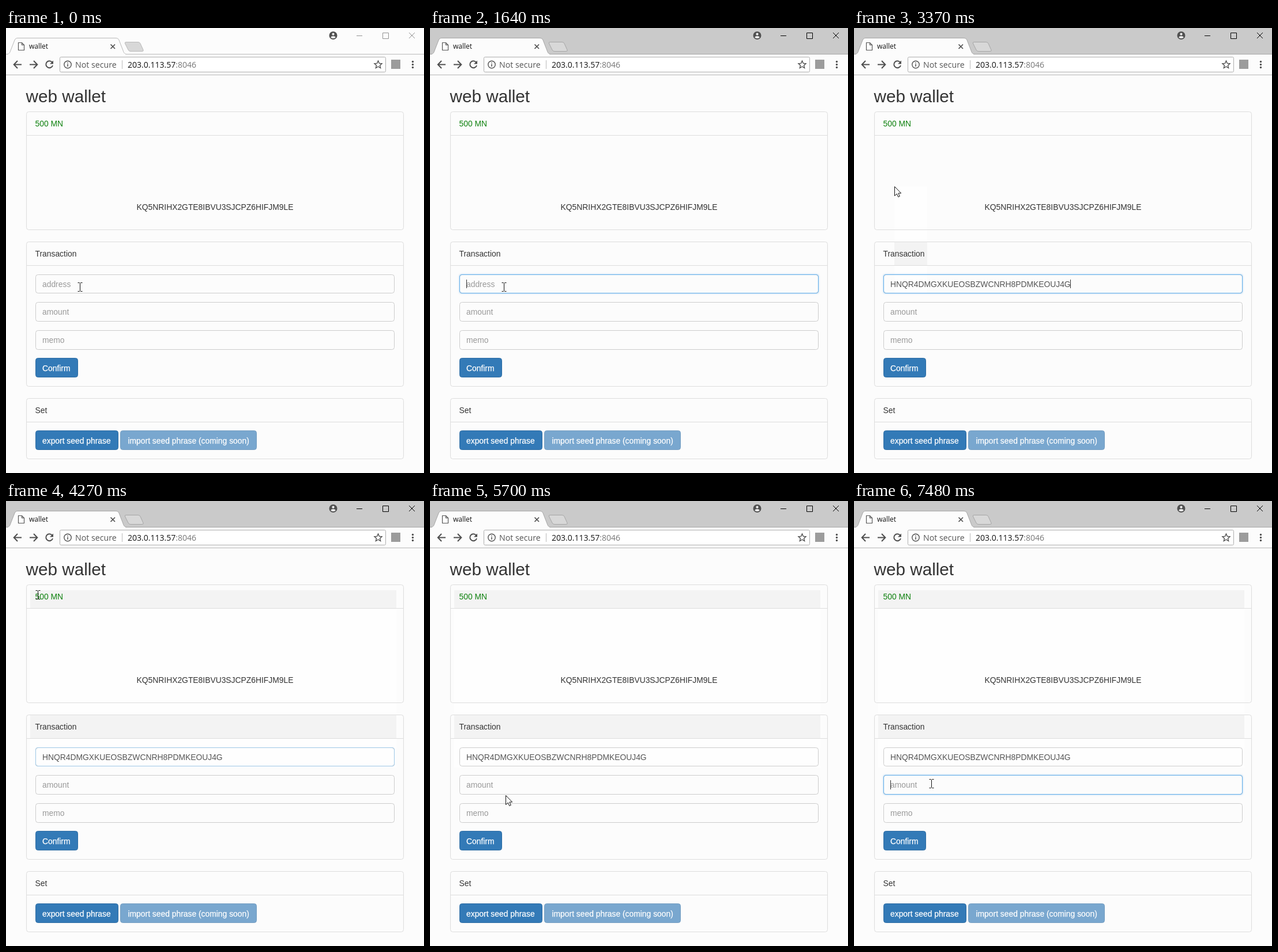
An HTML page for the animation above (8000 ms loop, 725x773 px).

```html
<!DOCTYPE html>
<html lang="en">
<head>
<meta charset="utf-8">
<title>wallet</title>
<style>
  html, body { margin: 0; width: 100%; height: 100%; overflow: hidden; background: #fcfcfc; }
  svg, .fresh, .ring { position: absolute; left: 0; top: 0; }
  svg { width: 725px; height: 773px; font: 13.86px "Liberation Sans", Arial, sans-serif; fill: #333; }
  .ui { font-family: "Open Sans", "Noto Sans", sans-serif; }
  .line { fill: none; stroke: #4f4f4f; stroke-width: 2; }
  .panel { fill: none; stroke: #ddd; }
  .field { fill: none; stroke: #ccc; }
  .hint { fill: #999; }
  .btn { fill: #337ab7; stroke: #2e6da4; }
  .label { fill: #fff; stroke: #fff; stroke-width: .25; }

  .anim { animation: 8s step-end -8ms infinite; }

  /* repainted part of the page, where the heading tint shows */
  .fresh {
    width: 725px; height: 773px;
    background: linear-gradient(#fefefe 146px, #f3f3f3 146px 186px, #fefefe 186px 372px, #f3f3f3 372px 412px, #fefefe 412px);
    animation-name: fresh;
  }
  .ring {
    box-sizing: border-box; left: 51px; width: 623px;
    border: 1px solid #66afe9; border-radius: 4px;
    box-shadow: 0 0 3px rgba(102, 175, 233, .7);
  }
  .r1 { top: 428px; height: 33px; animation-name: ring1; }
  .r2 { top: 476px; height: 34px; animation-name: ring2; }

  .bar { animation-name: bar; }
  .win { fill: none; animation-name: win; }
  .edge { animation-name: edge; }
  .empty { animation-name: empty; }
  .value { fill: #555; animation-name: value; }
  .caret1 { animation-name: caret1; }
  .caret2 { animation-name: caret2; }
  .mouse { animation-name: move; }
  .beam { animation-name: beam; }
  .arrow { animation-name: arrow; }

  @keyframes bar { 0% { fill: #fcfcfc } 6.25%, to { fill: #cacaca } }
  @keyframes win { 0% { stroke: #929292 } 6.25%, to { stroke: #000 } }
  @keyframes edge { 0% { stroke: #b9b9b9 } 6.25%, to { stroke: #a6a6a6 } }
  @keyframes empty { 0% { opacity: 1 } 27.75%, to { opacity: 0 } }
  @keyframes value { 0% { opacity: 0 } 27.75%, to { opacity: 1 } }
  @keyframes fresh {
    0% { clip-path: polygon(0 0, 0 0, 0 0) }
    42.125% { clip-path: polygon(70px 275px, 127px 275px, 127px 461px, 70px 461px) }
    44% { clip-path: polygon(56px 210px, 82px 210px, 82px 275px, 127px 275px, 127px 461px, 56px 461px) }
    45.5% { clip-path: polygon(46px 172px, 82px 172px, 82px 275px, 127px 275px, 127px 461px, 46px 461px) }
    47% { clip-path: polygon(42px 155px, 376px 155px, 376px 452px, 42px 452px) }
    53.375%, to { clip-path: polygon(42px 155px, 677px 155px, 677px 463px, 42px 463px) }
  }
  @keyframes ring1 {
    0% { opacity: 0 }
    7.75% { opacity: 1; border-color: #66afe9; box-shadow: 0 0 3px rgba(102, 175, 233, .7) }
    53.375% { opacity: 1; border-color: #9cc6e6; box-shadow: none }
    54.875%, to { opacity: 0 }
  }
  @keyframes ring2 { 0% { opacity: 0 } 81.625%, to { opacity: 1 } }
  @keyframes caret1 {
    0% { opacity: 0; transform: none }
    6.25% { opacity: 1; transform: none }
    13.125% { opacity: 0; transform: none }
    20.5% { opacity: 1; transform: none }
    25.875% { opacity: 0; transform: none }
    27.75% { opacity: 1; transform: translate(312px) }
    32.875% { opacity: 0; transform: translate(312px) }
    40.125% { opacity: 1; transform: translate(312px) }
    47%, to { opacity: 0; transform: translate(312px) }
  }
  @keyframes caret2 {
    0% { opacity: 0 } 79.625% { opacity: 1 } 86.5% { opacity: 0 } 93.5%, to { opacity: 1 }
  }
  @keyframes move {
    0% { transform: translate(128px, 450px) }
    36.625% { transform: translate(127px, 450px) }
    40.125% { transform: translate(124px, 453px) }
    42.125% { transform: translate(70px, 275px) }
    44% { transform: translate(56px, 210px) }
    45.5% { transform: translate(46px, 172px) }
    47% { transform: translate(42px, 160px) }
    48.5% { transform: translate(44px, 158px) }
    50% { transform: translate(52px, 163px) }
    51.5% { transform: translate(55px, 163px) }
    54.875% { transform: translate(69px, 166px) }
    56.75% { transform: translate(72px, 167px) }
    58.25% { transform: translate(74px, 168px) }
    61.375% { transform: translate(80px, 205px) }
    62.875% { transform: translate(88px, 255px) }
    64.375% { transform: translate(96px, 302px) }
    67.875% { transform: translate(106px, 350px) }
    69.5% { transform: translate(92px, 398px) }
    71.25% { transform: translate(131px, 511px) }
    72.75% { transform: translate(131px, 503px) }
    74.25% { transform: translate(131px, 495px) }
    75.75% { transform: translate(130px, 491px) }
    83.375%, to { transform: translate(134px, 491px) }
  }
  @keyframes beam {
    0% { opacity: 1 } 42.125% { opacity: 0 } 50% { opacity: 1 } 61.375% { opacity: 0 }
    69.5% { opacity: 1 } 71.25% { opacity: 0 } 74.25%, to { opacity: 1 }
  }
  @keyframes arrow {
    0% { opacity: 0 } 42.125% { opacity: 1 } 50% { opacity: 0 } 61.375% { opacity: 1 }
    69.5% { opacity: 0 } 71.25% { opacity: 1 } 74.25%, to { opacity: 0 }
  }
</style>
</head>
<body>
<div class="fresh anim"></div>

<svg viewBox="0 0 725 773">
  <!-- title bar -->
  <rect class="bar anim" width="725" height="45"/>
  <path class="edge anim" d="M0 45.5H725"/>
  <path class="edge anim" fill="#fcfcfc" d="M2 45.5C6 45 7 42 8 39L15 21C16 18.5 18 17.5 20 17.5H190C193 17.5 195 18.5 196 21L203 39C204 42 205 45 209 45.5"/>
  <path d="M4 45.5H207" stroke="#fcfcfc"/>
  <path class="edge anim" fill="#d8d8d8" d="M208 24.5H229Q232 24.5 233 27L238 38Q239 40.5 236 40.5H216Q213 40.5 212 38L206.500 27Q205.500 24.500 208 24.500Z"/>
  <path d="M21.500 25.500H27.500L31.500 29.500V38.500H21.500ZM27.500 25.500V29.500H31.500" fill="#fff" stroke="#555" stroke-width="1.200"/>
  <text class="ui" x="40" y="36" font-size="12" fill="#111">wallet</text>
  <path class="line" d="M181.500 28.500L189 36M189 28.500L181.500 36" style="stroke-width:1.700"/>
  <circle cx="567.500" cy="13" r="7" fill="#505050"/>
  <circle cx="567.500" cy="10.700" r="2.100" fill="#eee"/>
  <path d="M563.300 16.500C564 13.300 571 13.300 571.700 16.500Q567.500 19.500 563.300 16.500Z" fill="#eee"/>
  <path class="win anim" d="M608 13.500H618M653.500 8.500H663.500V18.500H653.500ZM699 8L709 18M709 8L699 18"/>

  <!-- toolbar -->
  <path d="M0 81.500H725" stroke="#b6b6b6"/>
  <path class="line" d="M27 63.500H14M20 57L13.700 63.500L20 70"/>
  <path class="line" d="M41 63.500H54M48 57L54.300 63.500L48 70"/>
  <path class="line" d="M80 59.500A6 6 0 1 0 81 65"/>
  <path d="M82 56.500V62.500H76Z" fill="#4f4f4f"/>
  <rect x="93.500" y="50.500" width="565" height="26" rx="2" fill="#fff" stroke="#adadad"/>
  <circle class="line" cx="107" cy="63.500" r="6.200" style="stroke-width:1.400"/>
  <path class="line" d="M107 62.500V67M107 59.700V61.300" style="stroke-width:1.500"/>
  <text class="ui" x="120" y="68.500" font-size="14.200" fill="#555">Not secure</text>
  <path d="M201.500 56V71" stroke="#bbb"/>
  <text class="ui" x="211" y="68.500" font-size="14" fill="#111">203.0.113.57<tspan fill="#777">:8046</tspan></text>
  <path class="line" style="stroke-width:1.400" d="M645.500 57L647.400 61.400L652 61.800L648.500 64.900L649.600 69.500L645.500 67L641.400 69.500L642.500 64.900L639 61.800L643.600 61.400Z"/>
  <rect x="668" y="55" width="16" height="16" fill="#9c9c9c"/>
  <g fill="#4f4f4f">
    <circle cx="705.500" cy="58.500" r="1.700"/>
    <circle cx="705.500" cy="63.500" r="1.700"/>
    <circle cx="705.500" cy="68.500" r="1.700"/>
  </g>

  <!-- page -->
  <text x="34.500" y="129" font-size="29.700">web wallet</text>
  <g class="panel">
    <rect x="35.500" y="145.500" width="654" height="205" rx="4"/>
    <rect x="35.500" y="371.500" width="654" height="251" rx="4"/>
    <rect x="35.500" y="643.500" width="654" height="105" rx="4"/>
    <path d="M36 186.500H689M36 412.500H689M36 684.500H689"/>
  </g>
  <text x="50.500" y="171" fill="#0d800d">500 MN</text>
  <text x="362.500" y="315.500" text-anchor="middle">KQ5NRIHX2GTE8IBVU3SJCPZ6HIFJM9LE</text>
  <text x="50.500" y="397">Transaction</text>
  <text x="50.500" y="669">Set</text>
  <g class="field">
    <rect x="51.500" y="428.500" width="622" height="32" rx="4"/>
    <rect x="51.500" y="476.500" width="622" height="33" rx="4"/>
    <rect x="51.500" y="525.500" width="622" height="33" rx="4"/>
  </g>
  <g class="hint">
    <text class="empty anim" x="63" y="449.500">address</text>
    <text x="63" y="498">amount</text>
    <text x="63" y="546.500">memo</text>
  </g>
  <text class="value anim" x="63" y="449.500">HNQR4DMGXKUEOSBZWCNRH8PDMKEOUJ4G</text>
  <rect class="caret1 anim" x="63" y="437" width="1" height="15"/>
  <rect class="caret2 anim" x="63" y="485" width="1" height="16"/>

  <rect class="btn" x="51.500" y="573.500" width="73" height="33" rx="4"/>
  <text class="label" x="63" y="595.500">Confirm</text>
  <rect class="btn" x="51.500" y="699.500" width="143" height="33" rx="4"/>
  <text class="label" x="63" y="721.500">export seed phrase</text>
  <g opacity=".65">
    <rect class="btn" x="198.500" y="699.500" width="236" height="33" rx="4"/>
    <text class="label" x="211.500" y="721.500">import seed phrase (coming soon)</text>
  </g>

  <g class="mouse anim">
    <path class="beam anim" fill="none" stroke="#111" d="M-3.500 -7.500H-.5L.5 -6.500L1.500 -7.500H4.500M.5 -6.500V6.500M-3.500 7.500H-.5L.5 6.500L1.500 7.500H4.500"/>
    <path class="arrow anim" fill="#fff" stroke="#111" d="M.5 .5V16.500L4.300 13L6.700 18.500L9.300 17.400L6.900 12H11.700Z"/>
  </g>
</svg>

<div class="ring r1 anim"></div>
<div class="ring r2 anim"></div>
</body>
</html>
```
